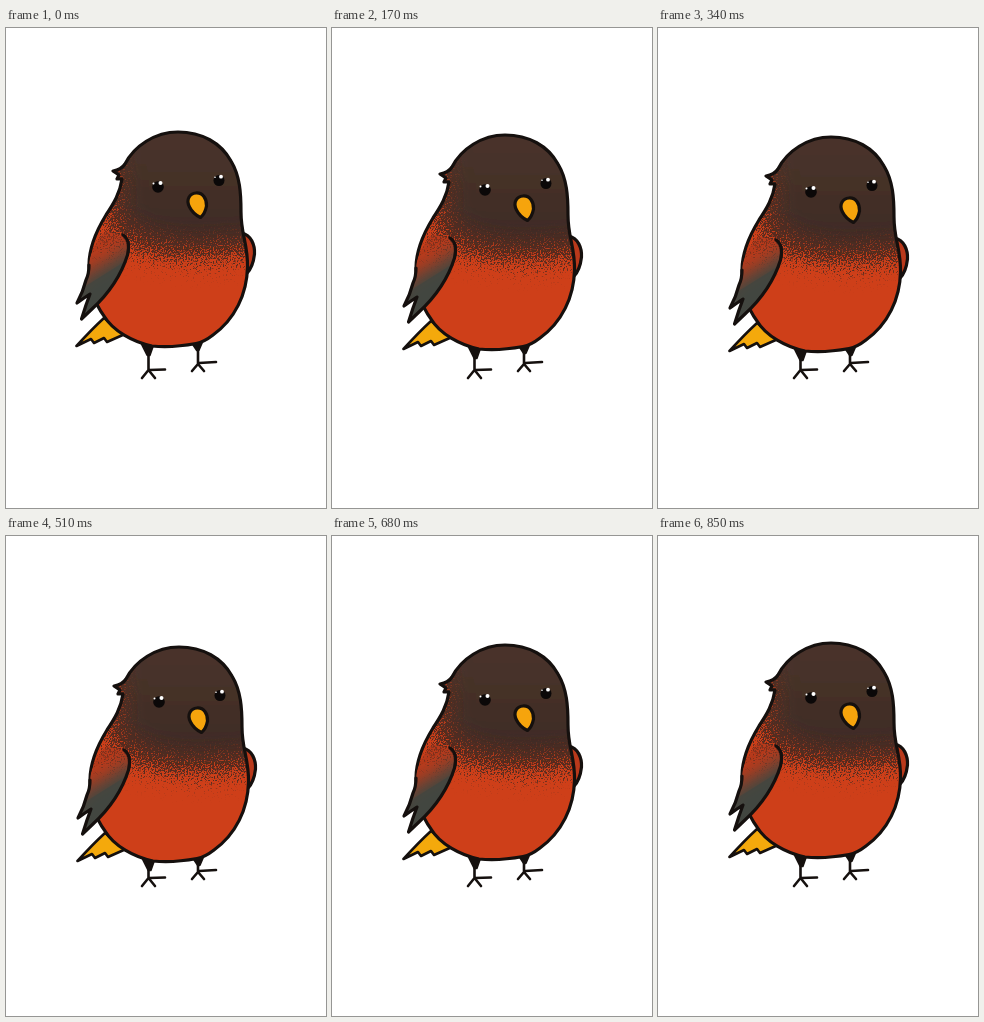
Animation, 320 px wide and 480 px high, one loop 1.02 s. Source, as an HTML page:

```html
<!DOCTYPE html>
<html lang="en">
<head>
<meta charset="utf-8">
<title>Bobbing bird</title>
<style>
  html, body { margin: 0; width: 100%; height: 100%; overflow: hidden; background: #fff; }
  svg { display: block; width: 100vw; height: 100vh; }
  .ink { stroke: #15100e; stroke-width: 3.2; stroke-linejoin: round; stroke-linecap: round; }
  .thin { stroke-width: 2.6; }
  .line { fill: none; }
  .bob { animation: bob 1020ms step-end infinite; }
  @keyframes bob {
    0%, 100% { transform: translate(0, 0); }
    16.6667%, 83.3333% { transform: translate(1px, 3px); }
    33.3333%, 66.6667% { transform: translate(1px, 5px); }
    50% { transform: translate(1px, 7px); }
  }
</style>
</head>
<body>
<svg viewBox="0 0 320 480">
  <defs>
    <path id="body" d="M172 104C196 104 215 115 225 133C234 148 235 165 235 184C235 207 242 216 241.500 239C241 266 229 291 207 307Q198 314 190 315.500Q166 320 146 318C127 314 107 303 98 288C89 276 83 258 83 237C83 217 92 200 100 187C108 175 114 165 116 151L111 151L113 147L107 143Q115 142 119 136C128 118 149 104 172 104Z"/>
    <path id="wing" d="M117 207Q125 212 121.500 227C114 251 99 269 86 281L75.500 291L80 277L84 266L78 270L71 275Q77 264 80 252Q83 246 83 237C83 226 91 211 99 203Z"/>
    <clipPath id="inBody"><use href="#body"/></clipPath>
    <clipPath id="inWing"><use href="#wing"/></clipPath>
    <linearGradient id="hood" gradientUnits="userSpaceOnUse" x1="0" y1="104" x2="0" y2="225">
      <stop offset="0" stop-color="#49332a"/>
      <stop offset=".6" stop-color="#422e27"/>
      <stop offset="1" stop-color="#3a2822"/>
    </linearGradient>
    <filter id="soft" filterUnits="userSpaceOnUse" x="40" y="40" width="270" height="310">
      <feGaussianBlur stdDeviation="9"/>
    </filter>
    <!-- Blurred shape broken into airbrush speckles -->
    <filter id="spray" filterUnits="userSpaceOnUse" x="40" y="40" width="270" height="310" color-interpolation-filters="sRGB">
      <feGaussianBlur in="SourceGraphic" stdDeviation="13" result="mist"/>
      <feTurbulence type="fractalNoise" baseFrequency=".7" numOctaves="2" seed="4"/>
      <feColorMatrix values="0 0 0 0 0  0 0 0 0 0  0 0 0 0 0  2.6 0 0 0 -.8" result="grain"/>
      <feComposite in="mist" in2="grain" operator="arithmetic" k2="1.1" k3="1" k4="-1"/>
      <feComponentTransfer><feFuncA type="linear" slope="3"/></feComponentTransfer>
      <feColorMatrix values="0 0 0 0 .25  0 0 0 0 .16  0 0 0 0 .13  0 0 0 .85 0"/>
    </filter>
  </defs>

  <g class="ink thin line">
    <path d="M142.500 322V342L136 350M142.500 342L149 350M143 342L159 341.500"/>
    <path d="M192 317V336L186 343M192 336L198 343M193 335L210 334"/>
  </g>

  <g class="bob">
    <path class="ink thin" fill="#15100e" d="M136 316L147 317L143.500 327L141.500 327ZM186 314.500L197 311.500L192.500 322L191 322Z"/>
    <path class="ink thin" fill="#f4a90c" d="M98 290Q86 301 70.500 318L85 311L88 315L98 310L101 314L119 306Z"/>
    <path class="ink" fill="#b9391b" d="M236 205C245 207 249 217 248.500 226Q247 239 241 245Z"/>

    <use href="#body" fill="#ce3f19"/>
    <g clip-path="url(#inBody)">
      <path d="M130 60H290V222Q212 236 165 232Q116 224 96 206L104 150Q96 100 130 60Z" filter="url(#spray)"/>
      <path d="M130 70H280V200Q203 213 165 208Q130 202 118 183L119 150Q108 112 130 70Z" fill="url(#hood)" filter="url(#soft)"/>
    </g>
    <use href="#body" class="ink line"/>

    <g clip-path="url(#inWing)">
      <use href="#wing" fill="#b93a1b"/>
      <path d="M110 185L128 210L86 226L92 200Z" filter="url(#spray)" opacity=".6"/>
      <path d="M130 214L108 230L74 250L50 300H110L140 235Z" fill="#424740" filter="url(#soft)"/>
      <path d="M130 226L110 239L78 259L60 300H110L140 240Z" fill="#424740" opacity=".7"/>
    </g>
    <path class="ink line" d="M117 207Q125 212 121.500 227C114 251 99 269 86 281L75.500 291L80 277L84 266L78 270L71 275Q77 264 80 252Q83 246 83 237"/>

    <g fill="#0b0808">
      <circle cx="152" cy="159" r="5.800"/>
      <circle cx="213" cy="152.500" r="5.500"/>
    </g>
    <g fill="#fff">
      <circle cx="154.500" cy="155" r="2"/>
      <circle cx="147.500" cy="155.500" r="1"/>
      <circle cx="215" cy="148.700" r="1.900"/>
      <circle cx="209" cy="149.300" r=".8"/>
    </g>
    <path class="ink" fill="#f6a40c" d="M190 165C197 164.500 201 171 200.500 178Q199 186 194.500 189.500Q187 186 183.500 179C179.500 171 184 165.500 190 165Z"/>
  </g>
</svg>
</body>
</html>
```
